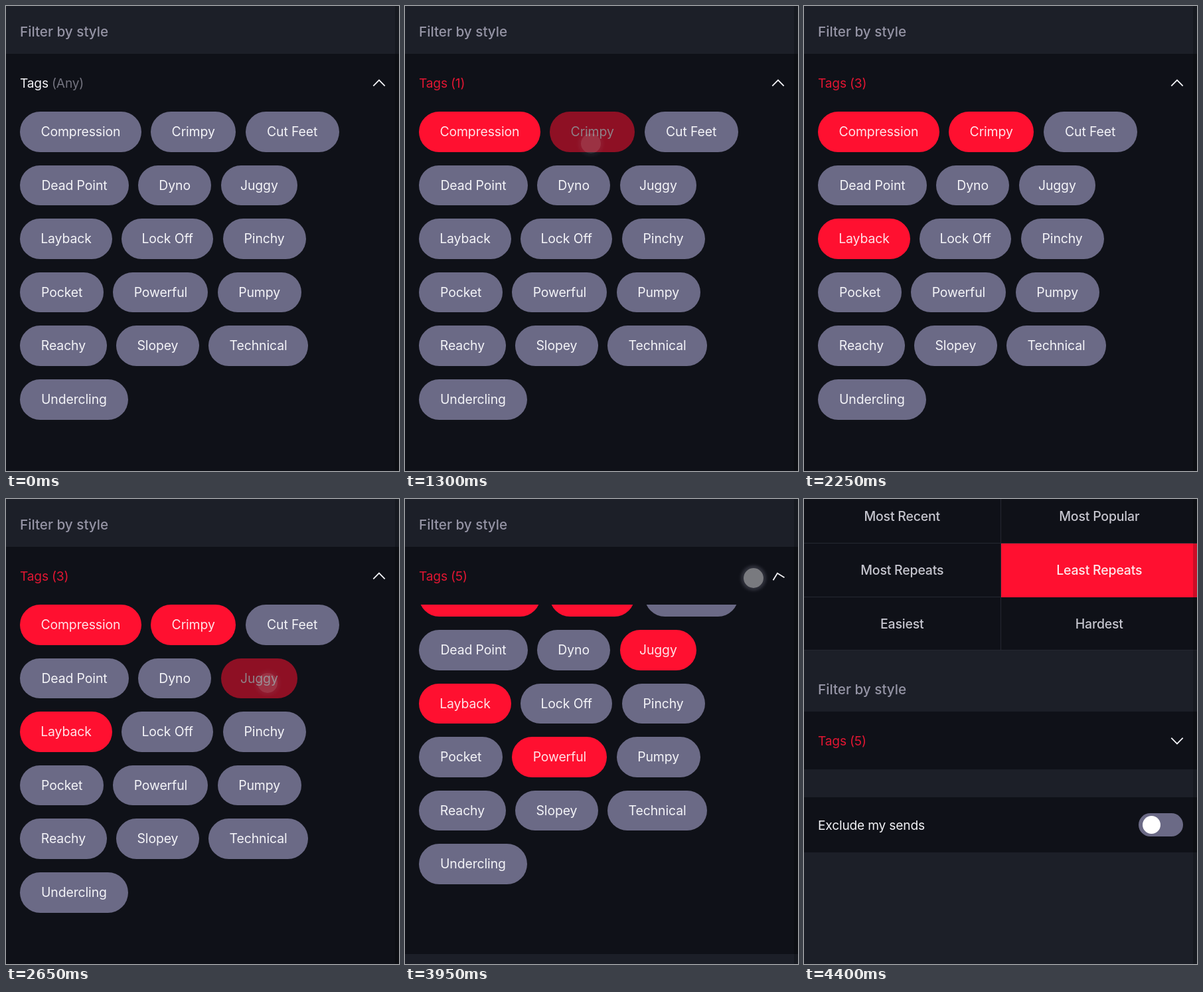
Write an HTML page that moves like this. It is 592 px wide and 700 px high and loops after 4450 ms.

```html
<!DOCTYPE html>
<html lang="en">
<head>
<meta charset="utf-8">
<title>Style filter</title>
<style>
  html, body { margin: 0; width: 100%; height: 100%; overflow: hidden; background: #1c1f28; }
  #stage {
    position: relative; width: 592px; height: 700px; overflow: hidden; background: #1c1f28;
    font: 400 19.2px/1 Inter, "Open Sans", sans-serif; letter-spacing: -.2px; white-space: nowrap;
  }
  #stage div, #stage svg { position: absolute; }
  #page, #rest { left: 0; top: 0; width: 592px; height: 0; }
  .dark { left: 0; width: 592px; background: #0f1118; }
  .label { left: 21px; height: 40px; line-height: 41px; color: #f2f2f6; }
  .title { font-size: 20.7px; font-weight: 500; letter-spacing: 0; color: #9594a5; }
  .cell {
    width: 296.5px; height: 80.7px; line-height: 81px; box-sizing: border-box; text-align: center;
    font-size: 19.5px; font-weight: 500; color: #c6c6cf; background: #0f1118;
    border: solid #252831; border-width: 0 0 1px;
  }
  .cell:nth-child(odd) { border-right-width: 1px; }
  .cell.on { background: #ff1030; border-color: #ff1030; color: #fde8ec; }
  #body { top: 159px; overflow: hidden; }
  #list { left: 0; bottom: 0; width: 592px; height: 569px; }
  .pill {
    height: 60.5px; line-height: 61px; border-radius: 31px; text-align: center;
    font-size: 19.4px; letter-spacing: -.1px; background: #6b6a86; color: #f4f4f8;
  }
  .pill.on { background: #ff1030; color: #ffe3e8; }
  #any { color: #73737f; }
  #chevron { left: 547.6px; top: 101.6px; width: 28px; height: 28px; }
  #toggle { left: 504px; top: 66px; width: 67px; height: 35px; border-radius: 18px; background: #6b6a86; }
  #knob { left: 6px; top: 4px; width: 27px; height: 27px; border-radius: 50%; background: #fff; }
  #dot {
    width: 30px; height: 30px; margin: -15px 0 0 -15px; border-radius: 50%;
    background: rgba(222, 222, 226, .87); box-shadow: 0 0 4px 4px rgba(175, 175, 200, .34);
  }
  #edge { right: 0; top: 0; width: 6px; height: 700px; background: rgba(0, 0, 0, .2); }
</style>
</head>
<body>
<div id="stage">
  <div id="page">
    <div id="sorts"></div>
    <div class="label title" style="top:18px">Filter by style</div>
    <div class="dark" style="top:72px;height:87px"></div>
    <div class="label" id="tags" style="top:96px">Tags <span id="any"></span></div>
    <svg id="chevron" viewBox="-14 -14 28 28"><path d="M-8.7 4.4 0-4.4 8.7 4.4" fill="none" stroke="#f4f4f8" stroke-width="1.8"/></svg>
    <div class="dark" id="body"><div id="list"></div></div>
    <div id="rest">
      <div class="dark" style="top:42px;height:83px"></div>
      <div class="label" style="top:64px">Exclude my sends</div>
      <div id="toggle"><div id="knob"></div></div>
    </div>
  </div>
  <div id="edge"></div>
  <div id="dot"></div>
</div>
<script>
const LOOP = 4450, BODY = 569, BODY_TOP = 159, SCROLL_LIMIT = 407;
const COLLAPSE = { start: 3893, length: 300 };
const $ = id => document.getElementById(id);
const ramp = (t, a, b) => Math.min(1, Math.max(0, (t - a) / (b - a)));
const ease = u => u < .5 ? 2 * u * u : 1 - 2 * (1 - u) ** 2;

function add(parent, cls, text, style) {
  const el = document.createElement('div');
  el.className = cls;
  el.textContent = text;
  Object.assign(el.style, style);
  parent.append(el);
  return el;
}

['Most Recent', 'Most Popular', 'Most Repeats', 'Least Repeats', 'Easiest', 'Hardest'].forEach((name, i) =>
  add($('sorts'), name === 'Least Repeats' ? 'cell on' : 'cell', name, {
    left: i % 2 * 296.5 + 'px', top: -261.7 + (i >> 1) * 80.7 + 'px'
  }));

const rows = [
  [['Compression', 182.5], ['Crimpy', 128.5], ['Cut Feet', 141]],
  [['Dead Point', 163.5], ['Dyno', 110.5], ['Juggy', 115.5]],
  [['Layback', 138.5], ['Lock Off', 138.5], ['Pinchy', 125]],
  [['Pocket', 126], ['Powerful', 143], ['Pumpy', 126]],
  [['Reachy', 130.5], ['Slopey', 125], ['Technical', 150]],
  [['Undercling', 162.5]]
];
const pills = {};
rows.forEach((row, r) => {
  let x = 21.2;
  for (const [name, w] of row) {
    pills[name] = add($('list'), 'pill', name, { left: x + 'px', top: r * 80.6 + 'px', width: w + 'px' });
    x += w + 14.2;
  }
});

// at: the moment the finger lifts and the tag turns red
const taps = [
  { name: 'Compression', at: 600, x: 112, y: 198 },
  { name: 'Crimpy', at: 1270, x: 280, y: 207 },
  { name: 'Layback', at: 1945, x: 106, y: 338 },
  { name: 'Juggy', at: 2620, x: 394, y: 277 },
  { name: 'Powerful', at: 2975, x: 238, y: 440 },
  { at: 3960, x: 525, y: 119 }
];

function draw(t) {
  let count = 0, glow = 0;
  for (const { name, at, x, y } of taps) {
    const shown = ramp(t, at - 290, at - 200) * (1 - ramp(t, at - 50, at + 50));
    if (shown > glow) {
      glow = shown;
      $('dot').style.left = x + 'px';
      $('dot').style.top = y + 'px';
    }
    if (!name) continue;
    const dim = ramp(t, at - 230, at - 110) * (1 - ramp(t, at + 20, at + 220));
    pills[name].style.opacity = 1 - .5 * dim;
    pills[name].classList.toggle('on', t >= at);
    if (t >= at + 100) count++;
  }
  $('dot').style.opacity = glow;
  $('tags').style.color = count ? '#e01632' : '';
  $('any').style.color = count ? 'inherit' : '';
  $('any').textContent = `(${count || 'Any'})`;

  const p = ease(ramp(t, COLLAPSE.start, COLLAPSE.start + COLLAPSE.length));
  const height = BODY * (1 - p), bottom = BODY_TOP + height;
  $('body').style.height = height + 'px';
  $('rest').style.top = bottom + 'px';
  $('page').style.transform = `translateY(${Math.max(0, SCROLL_LIMIT - bottom)}px)`;
  $('chevron').style.transform = `rotate(${-180 * p}deg)`;
}

const begin = performance.now();
function tick() {
  draw((performance.now() - begin) % LOOP);
  requestAnimationFrame(tick);
}
draw(0);
requestAnimationFrame(tick);
</script>
</body>
</html>
```
